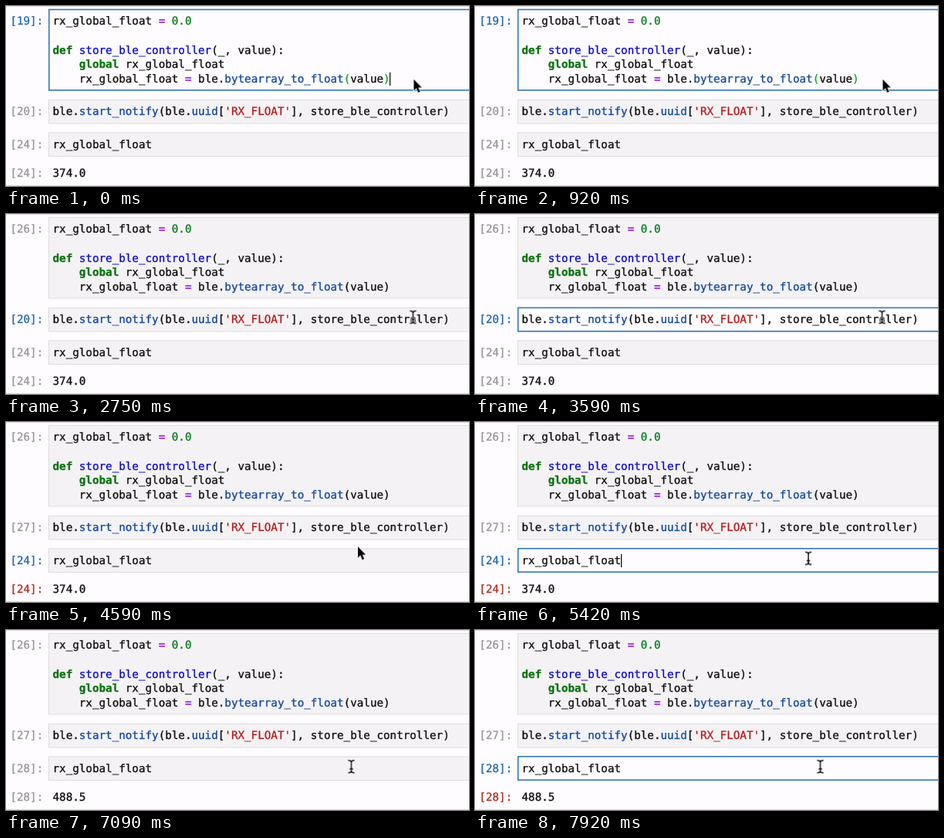
An HTML page that plays this animation: 600 by 233 pixels, repeating every 8 s.

```html
<!DOCTYPE html>
<html lang="en">
<head>
<meta charset="utf-8">
<title>Notebook cells</title>
<style>
html, body { margin: 0; width: 100%; height: 100%; overflow: hidden; background: #fefcfe; }
svg { display: block; width: 600px; height: 233px; }
text {
  --ink: #0c0c0c;
  font: 14.24px "DejaVu Sans Mono", monospace;
  text-rendering: geometricPrecision;
  white-space: pre;
}
text, tspan { fill: var(--ink); stroke: var(--ink); stroke-width: .3px; }
.cell { fill: #f4f2f4; stroke: #dedcde; }
.edit { fill: #fefcfe; stroke: #3478b8; stroke-width: 1.6; }
.caret { fill: #111; }
.rule { fill: #d9d7d9; }
.kw { --ink: #08710f; font-weight: bold; }
.op { --ink: #a22be8; font-weight: bold; }
.num { --ink: #087a1c; }
.fn { --ink: #0a0acb; }
.prop { --ink: #10489a; }
.str { --ink: #b01c1c; }
.prompt { --ink: #979597; }
.blue { --ink: #1f68a8; }
.red { --ink: #ae3024; }

/* Hard state changes; percentages are of the 8 s loop. */
.s { animation: 8s step-end infinite; }
.until1 { animation-name: until1; }
.from1 { animation-name: from1; }
.sel2 { animation-name: sel2; }
.until2 { animation-name: until2; }
.from2 { animation-name: from2; }
.until3 { animation-name: until3; }
.from3 { animation-name: from3; }
.sel3 { animation-name: sel3; }
.idle3 { animation-name: idle3; }
.sel4 { animation-name: sel4; }
.edit2 { animation-name: edit2; }
.edit3 { animation-name: edit3; }
.caret1 { animation-name: caret1; }
.caret2 { animation-name: caret2; }
.caret3 { animation-name: caret3; }
.match { animation-name: match; }
.arrow { animation-name: arrow; }
.beam { animation-name: beam; }
@keyframes until1 { 0% { opacity: 1 } 26.125%, 100% { opacity: 0 } }
@keyframes from1 { 0% { opacity: 0 } 26.125%, 100% { opacity: 1 } }
@keyframes sel2 { 0%, 47.875%, 100% { opacity: 0 } 26.125% { opacity: 1 } }
@keyframes until2 { 0% { opacity: 1 } 47.875%, 100% { opacity: 0 } }
@keyframes from2 { 0% { opacity: 0 } 47.875%, 100% { opacity: 1 } }
@keyframes until3 { 0% { opacity: 1 } 77.125%, 100% { opacity: 0 } }
@keyframes from3 { 0% { opacity: 0 } 77.125%, 100% { opacity: 1 } }
@keyframes sel3 { 0%, 77.125%, 100% { opacity: 0 } 47.875% { opacity: 1 } }
@keyframes idle3 { 0%, 90%, 100% { opacity: 0 } 77.125% { opacity: 1 } }
@keyframes sel4 { 0% { opacity: 0 } 90%, 100% { opacity: 1 } }
@keyframes edit2 { 0%, 47.875%, 100% { opacity: 0 } 37.5% { opacity: 1 } }
@keyframes edit3 { 0%, 77.125% { opacity: 0 } 61.5%, 90%, 100% { opacity: 1 } }
@keyframes caret1 { 0%, 12.9% { opacity: 1 } 6.25%, 19.5%, 100% { opacity: 0 } }
@keyframes caret2 { 0%, 44.1%, 100% { opacity: 0 } 37.5% { opacity: 1 } }
@keyframes caret3 {
  0%, 68.1%, 77.125%, 96.6%, 100% { opacity: 0 }
  61.5%, 74.75%, 90% { opacity: 1 }
}
@keyframes match {
  0% { fill: #14a51e; stroke: #14a51e }
  26.125%, 100% { fill: #0c0c0c; stroke: #0c0c0c }
}
@keyframes arrow { 0%, 55.6% { opacity: 1 } 18.75%, 58.6%, 100% { opacity: 0 } }
@keyframes beam {
  0%, 46.9%, 55.6%, 71.25% { opacity: 0 }
  30.25%, 54.25%, 58.6%, 85.5%, 100% { opacity: 1 }
}
.pointer { animation: move 8s linear infinite; }
@keyframes move {
  0%, 30% { transform: translate(528.5px, 95px) }
  30.01%, 54.25% { transform: translate(527.5px, 133.5px) }
  57.3%, 57.6% { transform: translate(456px, 161.3px) }
  59.5%, 85.5% { transform: translate(432px, 176.5px) }
  87.5%, 100% { transform: translate(447.5px, 176.8px) }
}
</style>
</head>
<body>
<svg viewBox="0 0 600 233">
  <defs>
    <path id="ibeam" d="M-3.6-8Q0-8 0-5.5Q0-8 3.6-8M0-5.5V5.5M-3.6 8Q0 8 0 5.5Q0 8 3.6 8M-1.8 3H1.8"/>
  </defs>
  <rect class="rule" width="600" height="1"/>
  <rect class="rule" y="232" width="600" height="1"/>

  <rect class="cell" x="55.5" y="4.5" width="560" height="104.5"/>
  <rect class="cell" x="55.5" y="121.5" width="560" height="30.5"/>
  <rect class="cell" x="55.5" y="164" width="560" height="30.5"/>
  <rect class="edit s until1" x="55.8" y="4.6" width="560" height="104.4"/>
  <rect class="edit s edit2" x="55.8" y="121.4" width="560" height="30.4"/>
  <rect class="edit s edit3" x="55.8" y="163.8" width="560" height="30.4"/>

  <text class="blue s until1" x="5.4" y="24">[19]:</text>
  <text class="prompt s from1" x="5.4" y="24">[26]:</text>

  <text class="prompt s until1" x="5.4" y="141">[20]:</text>
  <text class="blue s sel2" x="5.4" y="141">[20]:</text>
  <text class="prompt s from2" x="5.4" y="141">[27]:</text>

  <text class="prompt s until2" x="5.4" y="184">[24]:</text>
  <text class="blue s sel3" x="5.4" y="184">[24]:</text>
  <text class="prompt s idle3" x="5.4" y="184">[28]:</text>
  <text class="blue s sel4" x="5.4" y="184">[28]:</text>

  <text class="prompt s until2" x="5.4" y="221">[24]:</text>
  <text class="red s sel3" x="5.4" y="221">[24]:</text>
  <text class="prompt s idle3" x="5.4" y="221">[28]:</text>
  <text class="red s sel4" x="5.4" y="221">[28]:</text>

  <text x="60.5" y="24">rx_global_float <tspan class="op">=</tspan> <tspan class="num">0.0</tspan></text>
  <text x="60.5" y="62"><tspan class="kw">def</tspan> <tspan class="fn">store_ble_controller</tspan>(_, value):</text>
  <text x="94.8" y="80"><tspan class="kw">global</tspan> rx_global_float</text>
  <text x="94.8" y="99">rx_global_float <tspan class="op">=</tspan> ble.<tspan class="prop">bytearray_to_float</tspan><tspan class="s match">(</tspan>value<tspan class="s match">)</tspan></text>
  <text x="60.5" y="141">ble.<tspan class="prop">start_notify</tspan>(ble.<tspan class="prop">uuid</tspan>[<tspan class="str">'RX_FLOAT'</tspan>], store_ble_controller)</text>
  <text x="60.5" y="184">rx_global_float</text>
  <text class="s until3" x="60.5" y="221">374.0</text>
  <text class="s from3" x="60.5" y="221">488.5</text>

  <rect class="caret s caret1" x="497" y="86" width="1.3" height="17"/>
  <rect class="caret s caret2" x="523" y="128" width="1.3" height="17"/>
  <rect class="caret s caret3" x="189" y="171" width="1.3" height="17"/>

  <g class="pointer">
    <path class="s arrow" d="M0 0V14.4L3.3 11.3 5.7 17 8.2 16 5.8 10.4H10.2Z" fill="#000" stroke="#fff" stroke-width="1.6" paint-order="stroke"/>
    <g class="s beam" fill="none" stroke-linecap="round">
      <use href="#ibeam" stroke="#fff" stroke-width="3"/>
      <use href="#ibeam" stroke="#111" stroke-width="1.5"/>
    </g>
  </g>
</svg>
</body>
</html>
```
